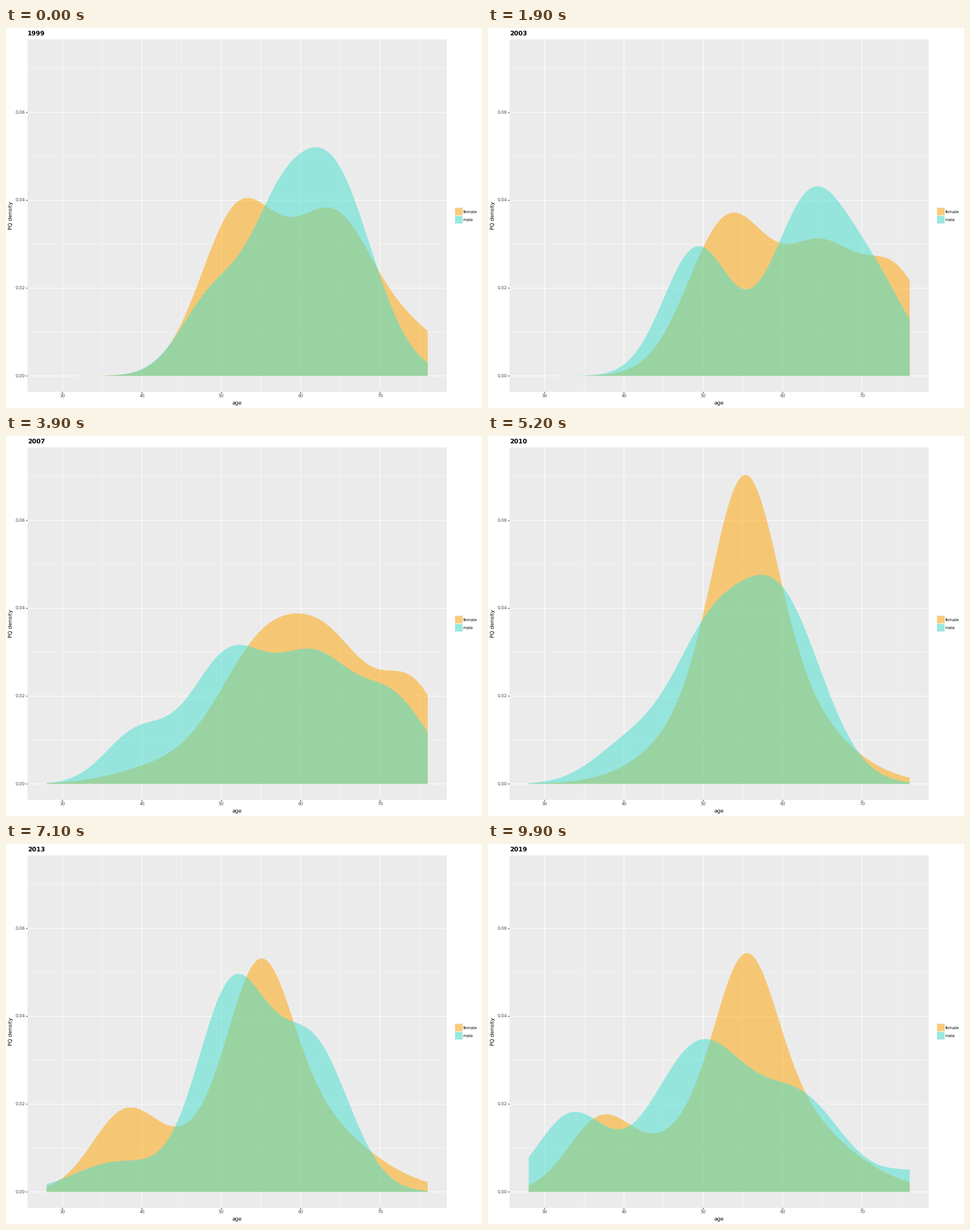
Write a matplotlib script that moves like this. It is 837 px wide and 669 px high and loops after 10000 ms.

```python
import numpy as np
import matplotlib.pyplot as plt
from matplotlib.animation import FuncAnimation
from matplotlib.patches import Polygon, Rectangle

W, H, DPI = 837, 669, 64
FRAMES, INTERVAL = 100, 100
FIRST, LAST = 1999, 2019
L, R, T, B = 38, 775, 20, 640.5

plt.rcParams.update({"font.family": "DejaVu Sans", "text.hinting": "none"})

# Age groups as (mean age, spread, peak density x 1e-4) at key steps of the loop.
FEMALE = {
    0: [(52.2, 4.8, 370), (64.1, 5.3, 360), (75, 4.5, 75)],
    19: [(53.3, 5.1, 360), (65, 4.6, 270), (74.3, 4.1, 220)],
    39: [(43, 6, 40), (55.3, 5.6, 300), (64.3, 5, 255), (74.2, 4, 205)],
    52: [(55.2, 3.9, 425), (56, 8.2, 280)],
    71: [(37.8, 4.2, 163), (54.9, 3.8, 300), (56.5, 9, 235)],
    83: [(39.3, 5, 76), (54.9, 3.8, 372), (56.5, 8.6, 245)],
    99: [(37, 4.1, 150), (55.4, 3.7, 300), (56.3, 9, 245)],
}
MALE = {
    0: [(49.3, 4.2, 185), (56.6, 3.5, 180), (63.5, 5.3, 483)],
    19: [(49.2, 4.2, 290), (63.6, 4.9, 405), (72.2, 4.3, 165)],
    39: [(39.3, 4, 112), (51, 5, 290), (61.9, 4.8, 265), (71.8, 4.4, 180)],
    52: [(41, 4.7, 92), (50.3, 4.6, 270), (59.4, 5.4, 422)],
    71: [(37, 5.5, 68), (51.4, 4.4, 460), (61.5, 4.6, 330)],
    83: [(33.3, 5.8, 101), (51.4, 4.7, 455), (62.5, 4.6, 258)],
    99: [(33.4, 4.3, 173), (49.7, 6, 338), (62.6, 5.2, 195), (77, 4.5, 45)],
}
AGES = np.linspace(28, 76, 400)


def px(age):
    return 99.4 + 13.96 * (age - 30)


def py(density):
    return 612.6 - 7730 * density


def mixture(groups):
    return sum(1e-4 * peak * np.exp(-((AGES - mean) / spread) ** 2 / 2)
               for mean, spread, peak in groups)


def density_at(keys, step):
    """Blend linearly between the two neighbouring key curves."""
    steps = list(keys)
    k = min(np.searchsorted(steps, step, side="right"), len(steps) - 1)
    a, b = steps[k - 1], steps[k]
    t = (step - a) / (b - a)
    return (1 - t) * mixture(keys[a]) + t * mixture(keys[b])


def outline(density):
    x = np.r_[px(28), px(AGES), px(76)]
    return np.column_stack([x, py(np.r_[0, density, 0])])


def label(x, y, text, size, **kw):
    return ax.text(x, y, text, fontsize=size * 72 / DPI, va="baseline", **kw)


def line(xs, ys, color, width, z):
    ax.plot(xs, ys, color=color, lw=width * 72 / DPI, zorder=z,
            solid_capstyle="butt", snap=False)


def box(x, y, w, h, color, alpha=1, z=0):
    ax.add_patch(Rectangle((x, y), w, h, fc=color, alpha=alpha, lw=0,
                           zorder=z, snap=False))


def grid(ages, densities, width, z):
    for age in ages:
        line([px(age)] * 2, [T, B], "white", width, z)
    for d in densities:
        line([L, R], [py(d)] * 2, "white", width, z)


fig = plt.figure(figsize=(W / DPI, H / DPI), dpi=DPI, facecolor="white")
ax = fig.add_axes([0, 0, 1, 1])
ax.axis("off")
ax.set_xlim(0, W)
ax.set_ylim(H, 0)
ax.set_autoscale_on(False)

# Panel, grid and axes
box(L, T, R - L, B - T, "#EBEBEB")
x_ticks, y_ticks = np.arange(30, 80, 10), np.arange(4) * .02
grid(x_ticks + 5, y_ticks + .01, .53, 1)
grid(x_ticks, y_ticks, 1.07, 2)
for age in x_ticks:
    line([px(age)] * 2, [B, B + 2.7], "#333333", 1.07, 2)
    label(px(age), 651, str(age), 7.5, color="#4D4D4D", ha="center")
for d in y_ticks:
    line([L - 2.7, L], [py(d)] * 2, "#333333", 1.07, 2)
    label(33.6, py(d) + 2.8, f"{d:.2f}", 7.6, color="#4D4D4D", ha="right")

label(406.4, 662.3, "age", 9.2, ha="center")
label(11.2, 330.2, "PQ density", 9.2, rotation=90, rotation_mode="anchor", ha="center")
title = label(37.8, 12.5, "", 11, weight="bold")

# Legend and areas
areas = []
series = [("female", "#FFA500", FEMALE), ("male", "#40E0D0", MALE)]
for j, (name, color, keys) in enumerate(series):
    y = 315.9 + 14.4 * j
    box(789, y, 14.4, 14.4, "#F2F2F2")
    box(789.7, y + .7, 13, 13, color, .5, 1)
    label(803.8, y + 10, name, 7.2)
    area = Polygon(outline(0 * AGES), closed=True, fc=color, alpha=.5, lw=0, zorder=3 + j)
    ax.add_patch(area)
    areas.append((area, keys))


def draw(step):
    title.set_text(str(round(FIRST + (LAST - FIRST) * step / (FRAMES - 1))))
    for area, keys in areas:
        area.set_xy(outline(density_at(keys, step)))
    return [title] + [area for area, _ in areas]


anim = FuncAnimation(fig, draw, frames=FRAMES, interval=INTERVAL, repeat=True,
                     repeat_delay=0)
plt.show()
```
